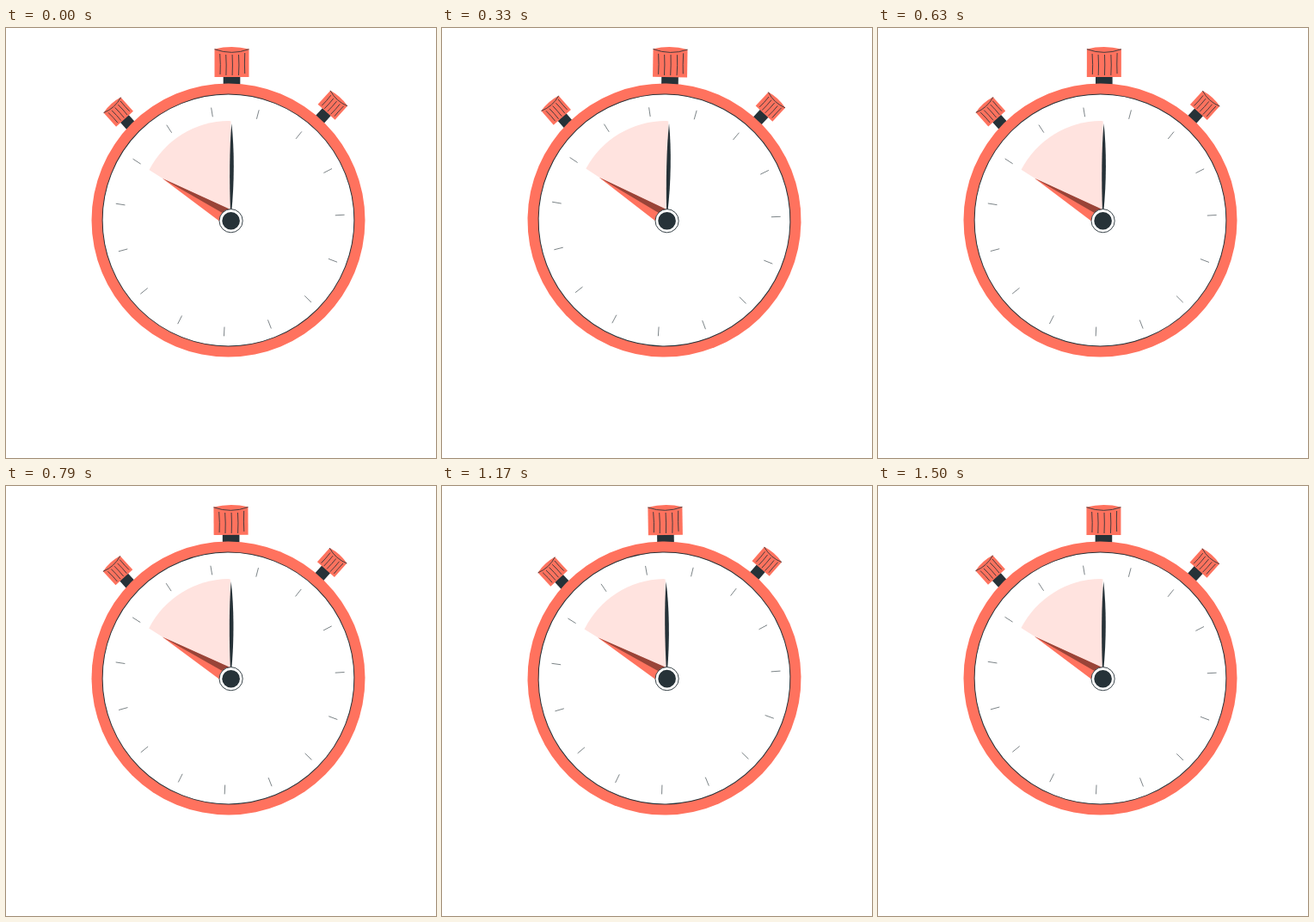
Write an HTML page that moves like this. It is 500 px wide and 500 px high and loops after 1.54 s.

```html
<!DOCTYPE html>
<html lang="en">
<head>
<meta charset="utf-8">
<title>Stopwatch</title>
<style>
  html, body { margin: 0; height: 100%; overflow: hidden; background: #fff; }
  svg { display: block; width: 100vw; height: 100vh; }
  .red { fill: #ff725e; }
  .dark { fill: #263238; }
  .line { fill: none; stroke: #263238; stroke-width: .85; vector-effect: non-scaling-stroke; }
</style>
</head>
<body>
<svg viewBox="0 0 500 500">
  <defs>
    <g id="knob">
      <path class="dark" d="M-9.8 -2H9.8V18H-9.8Z"/>
      <path class="red" d="M-20 0V-32.5Q0 -37.5 20 -32.5V0Z"/>
      <path class="line" d="M-20 -32.3Q0 -25 20 -32.3M-13.8 -27Q-12.8 -14 -13.5 -3M-6.8 -26Q-6 -14 -6.6 -2M.6 -26Q1.2 -14 .6 -2M8 -26Q8.8 -14 8 -2M15.2 -28Q14.6 -14 15.2 -4"/>
    </g>
  </defs>
  <g id="watch">
    <use href="#knob" transform="translate(262.5 57)"/>
    <use href="#knob" transform="translate(138 105.7) rotate(-42) scale(.67)"/>
    <use href="#knob" transform="translate(372.6 97.8) rotate(42) scale(.67)"/>
    <circle class="red" cx="258.5" cy="223.5" r="159"/>
    <circle cx="258.5" cy="223.5" r="146.4" fill="#fff" stroke="#263238"/>
    <path id="ticks" fill="none" stroke="#263238" stroke-width=".6"/>
    <path fill="#ffe3df" d="M261.5 213V108.5Q261 108 259 108A105 105 0 0 0 166.5 165L183 175.5Z"/>
    <path class="red" d="M182 175L262 212V235Z"/>
    <path fill="#994438" d="M182 175L262 211.5V221Z"/>
    <path class="dark" d="M262.3 111C265.6 140 265.7 180 262.2 214H261C259.7 180 259.7 140 262.3 111Z"/>
    <circle cx="261.6" cy="224.2" r="13.6" fill="#fff" stroke="#263238" stroke-width=".9"/>
    <circle class="dark" cx="261.6" cy="224.2" r="10.3"/>
  </g>
</svg>
<script>
  const LOOP = 1540, SWING = 1510, LEAD = 40, REST = 0.106;
  const watch = document.getElementById('watch');

  // Fifteen radial ticks, 24 degrees apart
  const polar = (r, deg) => {
    const a = deg * Math.PI / 180;
    return `${260 + r * Math.cos(a)} ${224.7 + r * Math.sin(a)}`;
  };
  let d = '';
  for (let deg = -3.2; deg < 356; deg += 24) d += `M${polar(123, deg)}L${polar(133.8, deg)}`;
  document.getElementById('ticks').setAttribute('d', d);

  // Triangle wave: 0, 1, 0, -1 over one unit of phase
  const triangle = p => 1 - Math.abs(((p + 0.25) % 1) * 4 - 2);

  function draw(now) {
    const t = now % LOOP;
    const tilt = triangle((t + LEAD) / SWING) - REST;
    watch.setAttribute('transform', `rotate(${tilt} 258.5 223.5)`);
    requestAnimationFrame(() => draw(performance.now() - start));
  }
  const start = performance.now();
  draw(0);
</script>
</body>
</html>
```
